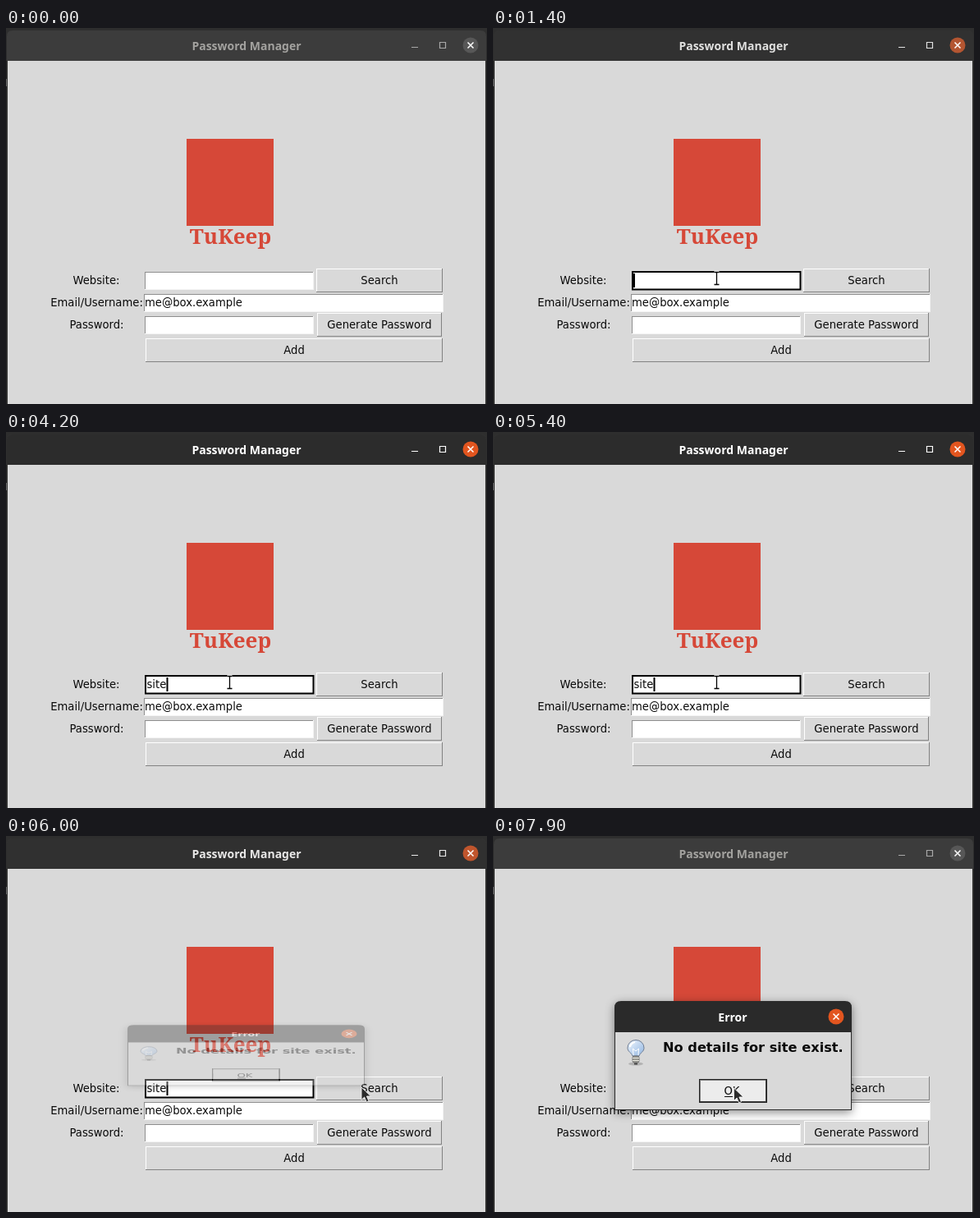
Animation of 586 by 458 pixels, one loop 8000 ms. Source, as an HTML page:

```html
<!DOCTYPE html>
<html lang="en">
<head>
<meta charset="utf-8">
<title>Password Manager</title>
<style>
  html, body { margin: 0; width: 100%; height: 100%; overflow: hidden; background: #2e2e2e; }
  svg { display: block; }
  text { font: 13.2px "DejaVu Sans", sans-serif; fill: #0a0a0a; white-space: pre; }
  .mid { text-anchor: middle; }
  .title { font: bold 14px "Noto Sans", "Open Sans", sans-serif; fill: #fff; text-anchor: middle; }
  .dim { fill: #a3a29f; }
  .brand { font: 900 26px "Noto Serif", serif; fill: #d64838; text-anchor: middle; }
  .alert { font: bold 16.2px "DejaVu Sans", sans-serif; }
</style>
</head>
<body>
<svg id="stage" width="586" height="458" viewBox="0 0 586 458">
  <defs>
    <filter id="shadow" x="-20%" y="-30%" width="140%" height="170%">
      <feDropShadow dx="0" dy="3" stdDeviation="6" flood-color="#000" flood-opacity=".45"/>
    </filter>
    <linearGradient id="glass" x1="0" y1="0" x2="1" y2="1">
      <stop offset="0" stop-color="#f2f8ff"/>
      <stop offset="1" stop-color="#8fb4e0"/>
    </linearGradient>
  </defs>
  <rect width="586" height="458" fill="#2e2e2e"/>
  <rect y="62" width="1" height="9" fill="#777"/>
  <g id="idleBar"></g>
  <g id="activeBar"></g>
  <rect x="2" y="40" width="582" height="418" fill="#d9d9d9"/>
  <rect x="220" y="135" width="106" height="106" fill="#d64838"/>
  <text class="brand" x="273.5" y="263">TuKeep</text>
  <g id="form"></g>
  <g id="focus">
    <rect x="170" y="297" width="204.5" height="21.5" fill="#fff" stroke="#000" stroke-width="2"/>
    <text id="typed" x="171.5" y="312"></text>
    <rect id="caret" y="299" width="2" height="17"/>
  </g>
  <g id="dialog">
    <path d="M148 334V209q0-8 8-8H429q8 0 8 8V334z" fill="#2c2c2c" filter="url(#shadow)"/>
    <rect x="149" y="239" width="287" height="94" fill="#d9d9d9"/>
    <text class="title" x="292" y="226">Error</text>
    <g id="dialogClose"></g>
    <g id="bulb">
      <ellipse cx="174" cy="277.5" rx="9" ry="2" fill="#000" opacity=".18"/>
      <path d="M170 268C169 264 164 263 164 258a10 9.5 0 0 1 20 0C184 263 179 264 178 268z"
            fill="url(#glass)" stroke="#6f7d92"/>
      <path d="M171 267L170.500 259L174 262L177.500 259L177 267" fill="none" stroke="#fff"/>
      <path d="M167 257q1-5 6-6" fill="none" stroke="#fff" stroke-width="2"/>
      <rect x="170" y="268" width="8" height="8" rx="2" fill="#9a9a94" stroke="#666" stroke-width=".8"/>
      <path d="M170 270.500h8M170 273.500h8" stroke="#e4e4dc"/>
      <path d="M172 277.500h4" stroke="#444" stroke-width="2"/>
    </g>
    <text class="alert" x="207" y="263">No details for site exist.</text>
    <g id="okButton"></g>
    <rect x="252.500" y="297.500" width="80" height="26" fill="none" stroke="#000" stroke-dasharray="1 1"/>
    <path d="M282 317.500h10" stroke="#0a0a0a"/>
  </g>
  <path id="arrow" d="M0 0V15.500L3.600 12L6.200 18L9 16.800L6.400 11H11.500z"
        fill="#2b2b2b" stroke="#f4f4f4" stroke-width=".9"/>
  <g id="beam" fill="none">
    <path d="M-3-7.500H3M0-7.500V7.500M-3 7.500H3" stroke="#fff" stroke-width="3"/>
    <path d="M-3-7.500H3M0-7.500V7.500M-3 7.500H3" stroke="#000" stroke-width="1.300"/>
  </g>
</svg>
<script>
const LOOP = 8000, STEP = 100;
const $ = id => document.getElementById(id);
const clamp = v => Math.max(0, Math.min(1, v));
const ramp = (t, a, b) => clamp((t - a) / (b - a));
const ease = p => p * p * (3 - 2 * p);
const show = (id, on) => $(id).setAttribute('visibility', on ? 'visible' : 'hidden');

const box = (x, y, w, h, fill, id = '') =>
  `<rect ${id && `id="${id}"`} x="${x}" y="${y}" width="${w}" height="${h}" fill="${fill}"/>`;
const label = (x, y, s, cls = 'mid') => `<text class="${cls}" x="${x}" y="${y}">${s}</text>`;

function closeButton(x, y, fill) {
  return `<circle cx="${x}" cy="${y}" r="9.5" fill="${fill}"/>
    <path d="M${x - 3.5} ${y - 3.5}l7 7m0-7l-7 7" stroke="#fff" stroke-width="1.5"/>`;
}

function titleBar(fill, ink, close, cls) {
  return `<path d="M1 40V10q0-7 7-7H578q7 0 7 7V40z" fill="${fill}"/>
    ${label(293, 27, 'Password Manager', 'title ' + cls)}
    <path d="M494 23.500h8M528.500 17.500h7v7h-7z" fill="none" stroke="${ink}" stroke-width="1.200"/>
    ${closeButton(566, 21, close)}`;
}

// Raised widget: light top and left, dark bottom and right
function button(x, y, w, h, text, id) {
  return box(x, y, w, h, '#828282') + box(x, y, w - 1, h - 1, '#fff') +
    box(x + 1, y + 1, w - 2, h - 2, '#d9d9d9', id) + label(x + w / 2, y + h / 2 + 4.5, text);
}

function field(x, y, w, h, text = '') {
  return box(x, y, w, h, '#f4f4f4') + box(x, y, w - 1, h - 1, '#8e8e8e') +
    box(x + 1, y + 1, w - 2, h - 2, '#fff') + label(x + 1, y + 15, text, '');
}

$('idleBar').innerHTML = titleBar('#3c3c3c', '#a8a8a8', '#575757', 'dim');
$('activeBar').innerHTML = titleBar('#2c2c2c', '#fff', '#e2551f', '');
$('dialogClose').innerHTML = closeButton(418, 220, '#e2551f');
$('okButton').innerHTML = box(251, 296, 83, 29, '#222') + button(252, 297, 81, 27, '', 'okFace') +
  label(291, 315, 'OK');
$('form').innerHTML =
  label(110, 312, 'Website:') + field(169, 297, 206, 22) +
  button(378, 293, 154, 29, 'Search', 'searchFace') +
  label(110.5, 339, 'Email/Username:') + field(168, 324, 365, 22, 'me@box.example') +
  label(110.5, 366, 'Password:') + field(169, 351, 206, 22) +
  button(379, 347, 152, 29, 'Generate Password') +
  button(170, 378, 362, 29, 'Add');

// Pointer path: start, end, from x, y, to x, y
const moves = [
  [500, 1000, 300, 45, 272.5, 305],
  [5400, 5800, 272.5, 305, 433, 306],
  [7100, 7800, 433, 306, 293.5, 307]
];
const keyTimes = [3200, 3300, 3600, 3900];
const caretX = [171, 179, 183, 188, 195.5];

function pointer(t) {
  const [a, b, x0, y0, x1, y1] = moves.filter(m => t >= m[0]).pop() || moves[0];
  const p = ease(ramp(t, a, b));
  return [x0 + (x1 - x0) * p, y0 + (y1 - y0) * p];
}

function draw(t) {
  const [x, y] = pointer(t);
  const open = ramp(t, 5900, 6200);
  const overField = !open && x > 169 && x < 375 && y > 296 && y < 319;

  $('activeBar').setAttribute('opacity', ramp(t, 1200, 1500) * (1 - ramp(t, 5900, 6300)));

  const typed = keyTimes.filter(k => t >= k).length;
  show('focus', t >= 1300);
  $('typed').textContent = 'site'.slice(0, typed);
  $('caret').setAttribute('x', caretX[typed]);
  $('caret').setAttribute('opacity', (t - 1300) % 900 < 600 && t < 6200 ? 1 : 0);

  const onSearch = !open && t >= 5400 && x > 378;
  $('searchFace').setAttribute('fill', onSearch ? '#ececec' : '#d9d9d9');
  $('okFace').setAttribute('fill', t > 7100 && x < 333 ? '#ececec' : '#d9d9d9');

  show('dialog', open > 0);
  $('dialog').setAttribute('opacity', open);
  $('dialog').setAttribute('transform', `translate(0 267) scale(1 ${open * (2 - open)}) translate(0 -267)`);

  show('beam', t >= 500 && overField);
  show('arrow', t >= 500 && !overField);
  $('beam').setAttribute('transform', `translate(${x} ${y})`);
  $('arrow').setAttribute('transform', `translate(${x} ${y})`);
}

const start = performance.now();
function tick() {
  const t = (performance.now() - start) % LOOP;
  draw(Math.floor(t / STEP) * STEP);
  requestAnimationFrame(tick);
}
tick();
</script>
</body>
</html>
```
